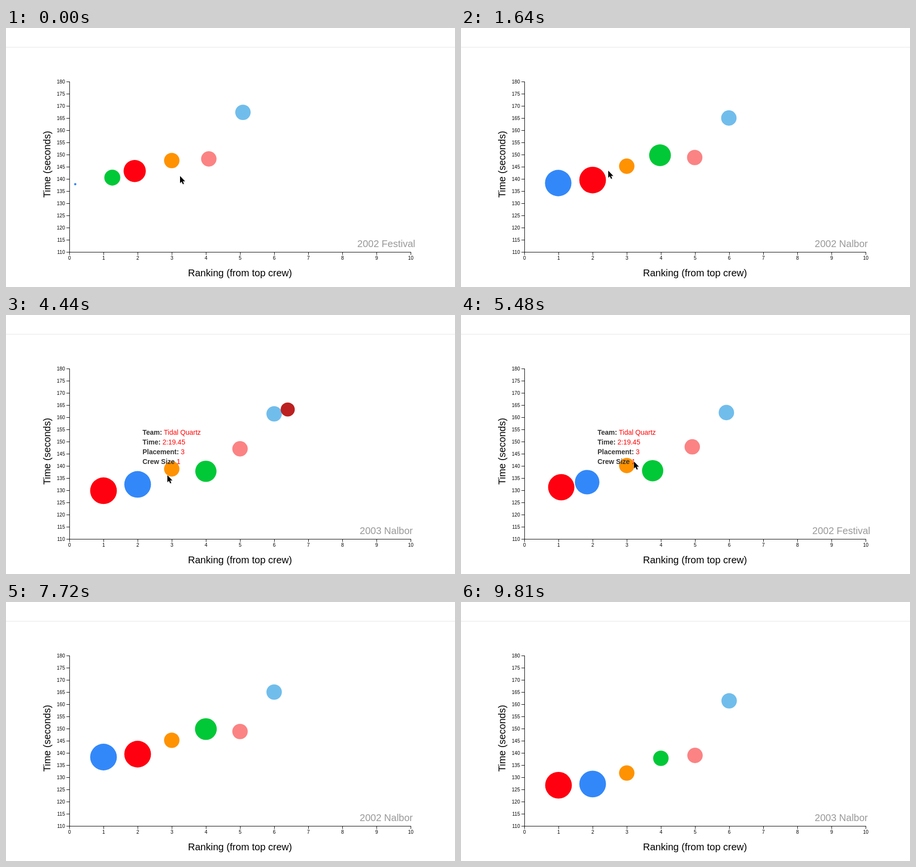
An HTML page for the animation above (9.91 s loop, 921 by 532 pixels).

```html
<!DOCTYPE html>
<html lang="en">
<head>
<meta charset="utf-8">
<title>Crew rankings</title>
<style>
  html, body { margin: 0; width: 100%; height: 100%; overflow: hidden; background: #fff; }
  svg { display: block; font-family: "Liberation Sans", Arial, sans-serif; }
  .axis { fill: none; stroke: #000; shape-rendering: crispEdges; }
  .tick { font-size: 10px; }
  .title { font-size: 20px; text-anchor: middle; }
  .tip { font-size: 14px; fill: #f00; }
  .tip .key { font-weight: bold; fill: #333; }
</style>
</head>
<body>
<svg width="921" height="532" viewBox="0 0 921 532">
  <path d="M0 39.5H921" stroke="#e5e5e5"/>
  <path id="axes" class="axis"/>
  <g id="ticks" class="tick"></g>
  <text class="title" x="480" y="510">Ranking (from top crew)</text>
  <text class="title" transform="translate(90.5 280) rotate(-90)">Time (seconds)</text>
  <text id="event" class="title" x="780" y="450" fill="#999"></text>
  <g id="dots"></g>
  <g id="tip" class="tip"></g>
  <g id="cursor">
    <path d="M1 2V16l3.3-3 2.3 5.2 2.4-1L6.7 12H11z" opacity=".2"/>
    <path d="M0 0V14.5l3.3-3 2.3 5.2 2.4-1L5.7 10.7H10.3z" stroke="#fff" stroke-width="1.2" paint-order="stroke"/>
  </g>
</svg>
<script>
// Timing in ms: every leg moves the crews to the next event, in steps
const LOOP = 9910, LEG = 1480, LEAD = 590, STEP = 150, SLACK = 20;

// Race results in finishing order, one letter per crew and one digit per crew size
const events = [
  { name: '2002 Festival', order: 'GROPS', sizes: '12111', times: [140.8, 144.5, 148.3, 148.27, 167.9] },
  { name: '2002 Nalbor', order: 'BROGPS', sizes: '331211', times: [138.3, 139.5, 145.2, 149.8, 148.8, 165] },
  { name: '2003 Festival', order: 'RBOGPS', sizes: '331111', times: [126.7, 127.19, 131.7, 137.8, 138.9, 161.4] },
  { name: '2003 Nalbor', order: 'RBOGPSM', sizes: '3312111', times: [130.1, 132.9, 139.45, 137.8, 147.8, 161.4, 161.6] }
];

// A crew with a home time shrinks onto the axis when absent, others vanish
const crews = {
  B: { color: '#3388f9', team: 'Fog Marsh Egrets', home: 138.3 },
  R: { color: '#ff0010' },
  O: { color: '#ff9200', team: 'Tidal Quartz' },
  G: { color: '#00c837' },
  P: { color: '#fb8384', team: 'Heron Moon' },
  S: { color: '#70bdec' },
  M: { color: '#bc2020' }
};

const hovers = [
  { from: 2924, to: 3990, id: 'B' },
  { from: 4282, to: 5770, id: 'O' },
  { from: 6655, to: 7120, id: 'P' }
];

// Pointer moves: [from, to, x, y]
const moves = [
  [0, 0, 357, 304], [890, 1630, 302, 293], [2370, 2960, 256, 356], [3850, 4440, 331, 329],
  [4590, 5040, 342, 306], [5330, 6220, 417, 275], [6830, 7600, 445, 540]
];

const $ = id => document.getElementById(id);
const lerp = (a, b, p) => a + (b - a) * p;
const clamp = p => Math.max(0, Math.min(1, p));
const ease = p => p < .5 ? 4 * p ** 3 : 1 - 4 * (1 - p) ** 3;
const xOf = rank => 130 + 70 * rank;
const yOf = seconds => 460 - 5 * (seconds - 110);
const clock = s => `${Math.floor(s / 60)}:${(s % 60).toFixed(2).padStart(5, '0')}`;
const legAt = t => Math.floor((t + LEAD) / LEG);
const legStart = leg => leg * LEG - LEAD;

function result(id, event) {
  const i = event.order.indexOf(id);
  return i < 0
    ? { rank: 0, time: crews[id].home || 180, size: 0 }
    : { rank: i + 1, time: event.times[i], size: +event.sizes[i] };
}

function circleAt(id, t) {
  const leg = legAt(t);
  const p = ease(clamp((t - legStart(leg) + 122) / 1000));
  const a = result(id, events[(leg + 3) % 4]), b = result(id, events[leg % 4]);
  const gone = !b.size && !crews[id].home;
  return {
    cx: xOf(lerp(a.rank, b.rank, p)),
    cy: yOf(lerp(a.time, b.time, p)),
    r: gone ? 0 : lerp(Math.sqrt(250 * a.size), Math.sqrt(250 * b.size), p)
  };
}

function drawAxes() {
  let d = 'M124 110.5H130.5V460.5H830.5V466', labels = '';
  for (let s = 110; s <= 180; s += 5) {
    d += `M124 ${yOf(s) + .5}h6`;
    labels += `<text x="121" y="${yOf(s) + 3.7}" text-anchor="end">${s}</text>`;
  }
  for (let i = 0; i <= 10; i++) {
    d += `M${xOf(i) + .5} 460v6`;
    labels += `<text x="${xOf(i) + .3}" y="476" text-anchor="middle">${i}</text>`;
  }
  $('axes').setAttribute('d', d);
  $('ticks').innerHTML = labels;
}

// The tip stays centred above the place where the crew was first touched
function showTip(hover) {
  const tip = $('tip');
  tip.innerHTML = '';
  if (!hover) return;
  const { id, from } = hover;
  const { rank, time, size } = result(id, events[legAt(from) % 4]);
  const rows = { 'Team:': crews[id].team, 'Time:': clock(time), 'Placement:': rank, 'Crew Size': size };
  tip.innerHTML = Object.entries(rows).map(([key, value], i) =>
    `<text y="${20 * i}"><tspan class="key">${key}</tspan> ${value}</text>`).join('');
  const { cx, cy, r } = circleAt(id, from);
  const x = Math.round(cx - tip.getBBox().width / 2), y = Math.round(cy - r - 65);
  tip.setAttribute('transform', `translate(${x} ${y})`);
}

function pointerAt(t) {
  let [, , x, y] = moves[0];
  for (const [from, to, toX, toY] of moves.slice(1)) {
    const p = clamp((t - from) / (to - from));
    x = lerp(x, toX, p);
    y = lerp(y, toY, p);
  }
  return [x, y];
}

drawAxes();
const ids = Object.keys(crews);
$('dots').innerHTML = ids.map(id => `<circle fill="${crews[id].color}"/>`).join('');
let shown;

function draw() {
  const t = performance.now() % LOOP;
  const leg = legAt(t), start = legStart(leg);
  const now = start + STEP * Math.floor((t - start + SLACK) / STEP);

  $('event').textContent = events[leg % 4].name;
  ids.forEach((id, i) => {
    // Stay inside the current leg, whose last step may touch the next one
    const circle = circleAt(id, Math.min(now, start + LEG - 1));
    for (const key in circle) $('dots').children[i].setAttribute(key, circle[key]);
  });

  const hover = hovers.find(h => now >= h.from && now < h.to);
  if (hover !== shown) showTip(shown = hover);
  $('cursor').setAttribute('transform', `translate(${pointerAt(now)})`);
  requestAnimationFrame(draw);
}
draw();
</script>
</body>
</html>
```
